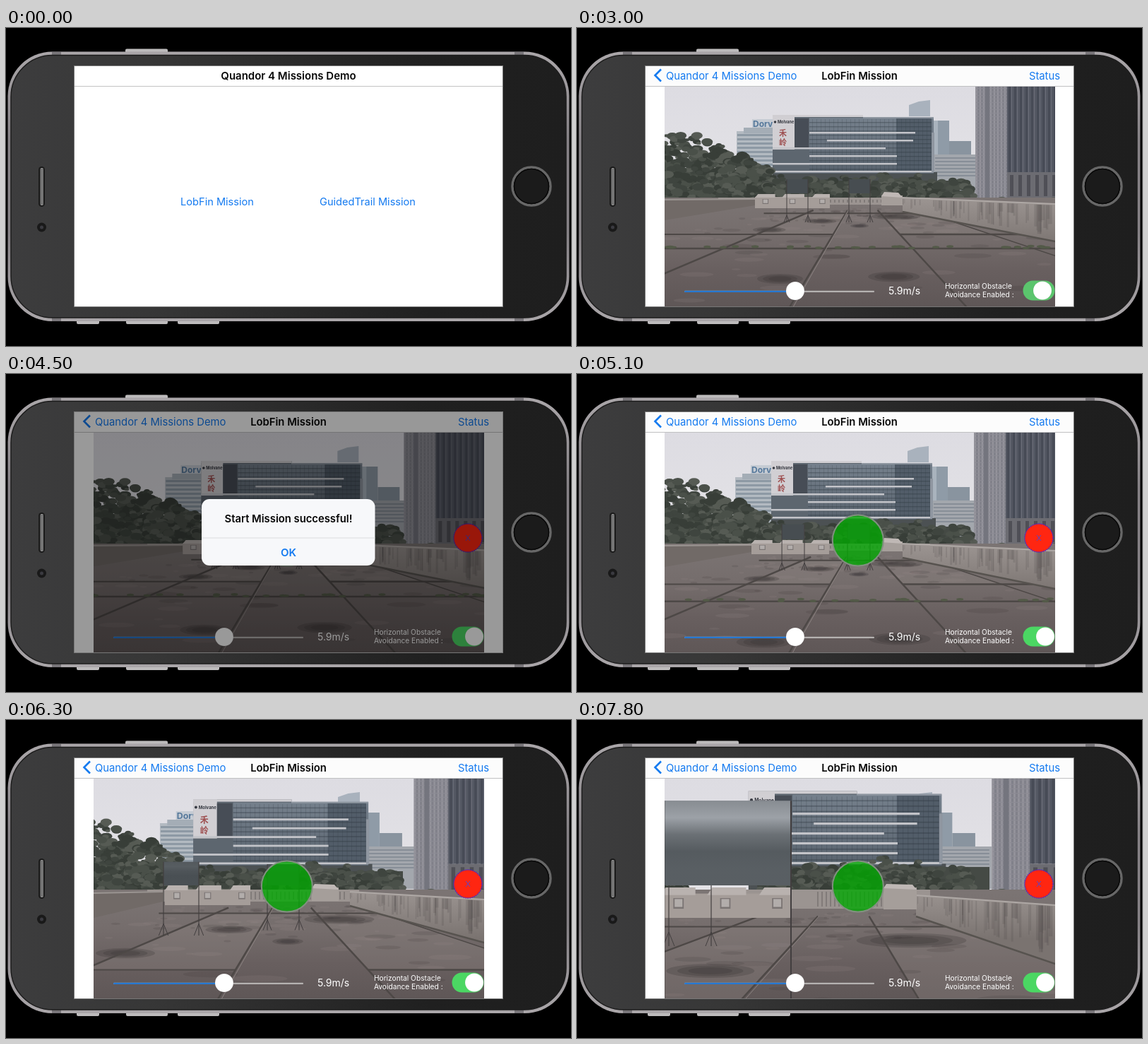
Write an HTML page with a canvas that moves like this. It is 800x450 px and loops after 8000 ms.

```html
<!DOCTYPE html>
<html lang="en">
<head>
<meta charset="utf-8">
<title>Mission demo</title>
<style>
html, body { margin: 0; width: 800px; height: 450px; overflow: hidden; background: #000; }
canvas { display: block; }
</style>
</head>
<body>
<canvas id="stage" width="800" height="450"></canvas>
<script>
const c = document.getElementById('stage').getContext('2d');
const LOOP = 8000, STEP = 300, BLUE = '#147af0';
const KEY_TIMES = [4200, 5100, 6300, 7800];
let now = 0, seed = 1;

const random = () => (seed = seed * 16807 % 2147483647) / 2147483647;

// Piecewise linear value over the flight
function key(...v) {
  if (now <= KEY_TIMES[0]) return v[0];
  for (let i = 1; i < 4; i++) {
    const a = KEY_TIMES[i - 1], b = KEY_TIMES[i];
    if (now <= b) return v[i - 1] + (v[i] - v[i - 1]) * (now - a) / (b - a);
  }
  return v[3];
}

function rect(x, y, w, h, fill) { c.fillStyle = fill; c.fillRect(x, y, w, h); }

function paint(fill, stroke, width) {
  if (fill) { c.fillStyle = fill; c.fill(); }
  if (stroke) { c.strokeStyle = stroke; c.lineWidth = width; c.stroke(); }
}

function round(x, y, w, h, r, fill, stroke, width = 1) {
  c.beginPath();
  c.roundRect(x, y, w, h, r);
  paint(fill, stroke, width);
}

function ellipse(x, y, rx, ry, fill, stroke, width = 1) {
  c.beginPath();
  c.ellipse(x, y, rx, ry, 0, 0, 7);
  paint(fill, stroke, width);
}

function path(points, fill, stroke, width = 1) {
  c.beginPath();
  for (let i = 0; i < points.length; i += 2) c.lineTo(points[i], points[i + 1]);
  paint(fill, stroke, width);
}

function text(s, x, y, size, fill, align = 'left', weight = 400) {
  c.font = `${weight} ${size}px Inter, sans-serif`;
  c.textAlign = align;
  c.fillStyle = fill;
  c.fillText(s, x, y);
}

function gradient(x0, y0, x1, y1, ...colors) {
  const g = c.createLinearGradient(x0, y0, x1, y1);
  colors.forEach((col, i) => g.addColorStop(i / (colors.length - 1), col));
  return g;
}

function phone() {
  rect(0, 0, 800, 450, '#000');
  round(169, 29.5, 60, 8, 2, '#bdbbbc');
  for (const [x, w] of [[100, 32], [170, 59], [243, 59]]) round(x, 411, w, 8, 2, '#bdbbbc');
  round(2.5, 33.5, 795, 381.5, 63, gradient(0, 34, 0, 415, '#aaa6a9', '#858185', '#858185', '#aaa6a9'));
  for (const x of [65, 720]) { rect(x, 34, 13, 5, '#787579'); rect(x, 410, 13, 5, '#787579'); }
  round(7, 38.5, 786, 371.5, 59, gradient(0, 0, 800, 0, '#3d3d3e', '#373737', '#2b2b2b', '#202020', '#1e1e1e'), '#1c1c1c', 1.5);
  ellipse(50.5, 282, 6.5, 6.5, '#191919');
  ellipse(50.5, 282, 2.5, 2.5, '#3a3a40');
  round(46, 196, 9, 57, 4.5, '#1b1b1b');
  round(48.5, 198, 4.5, 53, 2, '#8b8b8b');
  for (let y = 200; y < 250; y += 2) rect(48.5, y, 4.5, 0.8, '#555');
  ellipse(744, 224, 27, 27, '#1b1b1b', '#676767', 3.5);
  ellipse(744, 224, 24.5, 24.5, null, '#080808', 1.5);
  rect(96, 53, 608, 342, '#777');
  rect(97, 54, 606, 340, '#fff');
}

function foliage(x0, x1, top, bottom, count) {
  const colors = ['#3f453f', '#4a5049', '#565b54', '#383e38'];
  for (let i = 0; i < count; i++) {
    const u = random(), v = random() ** 0.8, r = 2 + random() * 3.5;
    const lift = top + (bottom - top) * (2 * u - 1) ** 2 * 0.35;
    ellipse(x0 + (x1 - x0) * u, lift + r + (bottom - lift - r) * v, r * 1.6, r, colors[i % 4]);
  }
}

function farBuildings() {
  c.save();
  c.translate(key(0, -2, -15.5, -22), 0);
  c.scale(key(1, 1, 1.033, 1.05), 1);
  path([470, 125, 470, 109, 484, 104, 500, 102, 500, 125], '#a9b2bd');
  rect(505, 131, 22, 60, '#8f9ba7');
  rect(505, 131, 6, 60, '#a9b3bd');
  rect(527, 160, 31, 30, '#89949f');
  rect(505, 179, 75, 60, '#a3a7ad');
  for (let y = 183; y < 212; y += 5) rect(507, y, 70, 2, '#878e97');
  rect(248, 129, 30, 15, '#c5cbd3');
  rect(226, 146, 52, 66, '#b3bac1');
  rect(236, 141, 42, 8, '#a4adb6');
  for (let y = 150; y < 206; y += 6) rect(227, y, 51, 3, '#8d99a4');
  text('Dorv', 249, 140, 12, '#55789b', 'left', 700);
  c.restore();
}

function nearBuildings() {
  c.save();
  c.translate(key(0, -2, -36.3, -89.6), 206);
  c.scale(key(1, 1, 1.088, 1.2), key(1, 1, 1.13, 1.27));
  c.translate(0, -206);
  rect(277, 204, 233, 36, '#4c5153');
  rect(277, 123, 128, 83, '#5d666f');
  rect(329, 127, 176, 79, gradient(0, 127, 0, 206, '#75808c', '#59636e'));
  rect(452, 127, 50, 76, '#525d69');
  for (let x = 333; x < 502; x += 6) rect(x, 129, 0.7, 74, 'rgba(45,52,62,.25)');
  for (let y = 133; y < 203; y += 6) rect(329, y, 173, 1.5, 'rgba(45,52,62,.35)');
  rect(277, 123, 31, 49, '#d1cfd3');
  rect(308, 128, 20, 43, '#474d56');
  rect(277, 123, 128, 3, '#d0ced2');
  rect(405, 126, 100, 2, '#8d959f');
  for (const [x, y, w] of [[329, 147, 150], [354, 158, 122], [277, 169, 160], [329, 180, 124], [277, 191, 176], [277, 202, 228]])
    rect(x, y, w, 2.5, '#c3c4c9');
  rect(502, 148, 4, 56, '#8f96a0');
  ellipse(280.5, 133, 1.8, 1.8, '#383b43');
  text('Molvane', 284, 135, 5.5, '#33363e', 'left', 700);
  c.font = '700 11px "Noto Sans CJK SC", "Noto Sans CJK", sans-serif';
  c.fillStyle = '#9e5051';
  c.fillText('禾', 286, 153);
  c.fillText('岭', 286, 166);
  // Tower
  rect(564, 0, 46, 240, '#94939b');
  for (let x = 567; x < 608; x += 5) rect(x, 0, 2.8, 240, '#81818a');
  for (let y = 80; y < 236; y += 5) rect(565, y, 44, 1, '#8c8b94');
  rect(578, 0, 6, 240, '#74757e');
  rect(609, 0, 120, 204, '#545863');
  for (let x = 611; x < 720; x += 8) { rect(x, 0, 3, 204, '#474b56'); rect(x + 4, 0, 1, 204, '#6b6d78'); }
  rect(609, 204, 120, 36, '#6c6c72');
  for (let x = 613; x < 720; x += 12) rect(x, 208, 5, 30, '#4f4f56');
  c.restore();
}

function ground() {
  const vx = key(400, 399, 399, 385), camX = key(0, 0, 0, 32), camZ = key(0, 0.13, 0.8, 1.5);
  const at = (x, z) => [vx + (x - camX) / Math.max(z - camZ, 0.25), 230 + 100 / Math.max(z - camZ, 0.25)];
  rect(124, 240, 553, 154, gradient(0, 245, 0, 394, '#7b7473', '#756d6c', '#685f5f', '#5f5757'));
  const seam = (x0, z0, x1, z1, width, color = '#4d4846') => path([...at(x0, z0), ...at(x1, z1)], null, color, width);
  path([...at(-235, 3.1), ...at(-60, 3.1), ...at(-60, 1.61), ...at(-235, 1.61)], 'rgba(140,132,129,.35)');
  path([...at(92, 3.1), ...at(300, 3.1), ...at(300, 1.61), ...at(92, 1.61)], 'rgba(140,132,129,.35)');
  // Stains on the concrete
  seed = 23;
  for (let i = 0; i < 170; i++) {
    const z = 0.6 + random() * 3.2, x = (random() - 0.5) * 850, size = 4 + random() * 26, d = z - camZ;
    if (d < 0.4) continue;
    ellipse(...at(x, z), size / d, size * 0.09 / d + 1, i % 2 ? 'rgba(60,54,54,.16)' : 'rgba(160,150,147,.13)');
  }
  for (const [x, z, w] of [[-230, 1.8, 42], [0, 2, 26], [140, 2.72, 95], [-125, 2.3, 50], [-90, 0.8, 26], [40, 0.82, 30]]) {
    const d = z - camZ, [px, py] = at(x, z);
    if (d < 0.3) continue;
    for (const size of [1, 0.75, 0.5])
      ellipse(px, py, w * size / d, (0.1 * w + 3) * size / d, 'rgba(52,47,49,.24)');
  }
  seam(-420, 3.1, 400, 3.1, 2);
  seam(-700, 1.61, -60, 1.61, 2);
  seam(92, 1.61, 700, 1.61, 2.5);
  seam(-700, 1.22, 700, 1.22, 2.5);
  for (const x of [-235, -60, 92]) seam(x, 3.6, x, 0.3, 2.5);
  seam(-57, 3.6, -57, 0.3, 1, '#8b8381');
  seam(300, 3.1, 300, 0.3, 1.5);
  // Weeds along the wide joint
  seed = 11;
  for (let i = 0; i < 34; i++) {
    const [x, y] = at(-330 + random() * 680, 1.2 + random() * 0.04);
    if (1.22 - camZ > 0.35) ellipse(x, y - 2, 5, 1.8, '#535a48');
  }
}

function walls() {
  const mid = key(250, 250, 257, 267);
  rect(200, 240, 300, mid - 240, '#9b9491');
  for (let x = 340; x < 480; x += 6) rect(x, 243, 2, mid - 246, '#817b79');
  const lx = key(252, 247, 222, 100), lt = key(242, 242, 243, 245), lb = key(251, 252, 257, 265);
  path([124, key(243, 243, 245, 246), lx, lt, lx, lb, 124, key(272, 273, 280, 285)], '#716a67');
  path([124, key(243, 243, 245, 246), lx, lt], null, '#9a9491', 2);
  const rx = key(461, 461, 487, 480), top = key(240, 240, 243, 248), top2 = key(249, 250, 254, 262);
  const bottom = key(260, 260, 263, 278), bottom2 = key(302, 304, 315, 345);
  path([rx, top, 677, top2, 677, bottom2, rx, bottom], gradient(0, 240, 0, 310, '#9c9592', '#7a7370'));
  path([rx, top, 677, top2], null, '#aea8a5', 2);
  seed = 7;
  for (let i = 0; i < 60; i++) {
    const u = random(), x = rx + (677 - rx) * u, y0 = top + (top2 - top) * u, y1 = bottom + (bottom2 - bottom) * u;
    rect(x, y0 + 2, 1 + 6 * random() * u, (y1 - y0 - 3) * (0.3 + random() * 0.6), 'rgba(78,71,69,.2)');
  }
  path([rx, bottom, 677, bottom2], null, '#57534f', 2.5);

  // Sheds
  const x0 = key(252, 247, 225, 118), x1 = key(358, 357, 346, 302), y0 = key(235, 235, 234, 237), y1 = key(255, 255, 262, 280);
  const w = x1 - x0, h = y1 - y0;
  rect(x0, y0 + h * 0.2, w, h * 0.8, '#a59d99');
  for (const [u, size] of [[0, 0.27], [0.36, 0.3], [0.76, 0.24]]) {
    path([x0 + w * u, y0 + h * 0.25, x0 + w * (u + 0.04), y0, x0 + w * (u + size), y0, x0 + w * (u + size), y0 + h * 0.25], '#b9b2af');
    rect(x0 + w * (u + 0.1), y0 + h * 0.35, w * 0.08, h * 0.35, '#7b7574');
    rect(x0 + w * (u + 0.11), y0 + h * 0.38, w * 0.06, h * 0.26, '#b2adab');
  }
  const sx = key(431, 431, 433, 434), sw = key(30, 30, 38, 47), sh = key(18, 18, 23, 35);
  rect(sx, 237, sw, sh - 4, '#a59e9a');
  path([sx, 238, sx + 4, 232, sx + sw - 6, 233, sx + sw, 240], '#bfb8b5');
}

function panel(right, depth) {
  const w = 30 / depth, left = right - w, h = 20 / depth, foot = 230 + 45 / depth;
  const shine = Math.max(0, 0.7 - depth);
  rect(left, 234 - h, w, h, '#474d51');
  const glint = a => `rgba(205,209,216,${shine * a})`;
  rect(left, 234 - h, w, h, gradient(0, 234 - h, 0, 234, glint(0.9), glint(1.2), glint(0.5), glint(0.2), glint(0.25), glint(0.25)));
  for (const x of [left, right]) {
    path([x, 234 - h, x, foot], null, '#423e3f', 0.8 + 0.2 / depth);
    const s = 4 / depth;
    path([x - s, foot, x, foot - 2.5 * s, x + s, foot], null, '#423e3f', 1);
  }
}

function photo() {
  c.save();
  c.beginPath();
  c.rect(124, 83, 553, 311);
  c.clip();
  rect(124, 83, 553, 170, gradient(0, 83, 0, 220, '#dddce2', '#e3e2e6'));
  farBuildings();
  nearBuildings();
  seed = 5;
  const shift = key(0, -4, -28, -120);
  rect(90 + shift, 200, 185, 45, '#434942');
  foliage(85 + shift, 220 + shift, key(143, 143, 135, 130), 242, 520);
  foliage(200 + shift, 275 + shift, key(174, 174, 165, 160), 242, 240);
  const rowTop = key(204, 204, 202, 196);
  rect(262, rowTop + 12, key(278, 278, 300, 322), 35, '#454a45');
  for (let i = 0; i < 6; i++)
    foliage(256 + i * 48, 320 + i * 48, rowTop + (i % 2) * 4 - (i === 3 ? key(5, 5, 8, 10) : 0), 241, 70);
  foliage(575, 690, 236, 251, 25);
  ground();
  walls();
  panel(key(327, 322, 273, 190), key(1, 0.94, 0.6, 0.5));
  const depth = key(1, 0.94, 0.667, 0.167);
  panel(400 + key(15, 14, 10, -16.2) / depth, depth);
  c.restore();
}

function controls() {
  const speed = now < 2400 ? 5 : now < 2700 ? 5.4 : 5.9;
  const knob = 287 + (speed - 5) * 24.4;
  round(152, 371.8, 269, 2.2, 1, '#b5b2b1');
  round(152, 371.8, knob - 152, 2.2, 1, '#2678d2');
  ellipse(knob, 372, 13, 13, '#fff', 'rgba(0,0,0,.12)', 0.6);
  text(speed + 'm/s', 441, 376.5, 14, '#fff');
  text('Horizontal Obstacle', 521, 369, 10.2, '#fff');
  text('Avoidance Enabled :', 521, 381, 10.2, '#fff');

  const on = now >= 3000, settling = now < 3300;
  round(631.5, 357.5, 45, 28, 14, on ? (settling ? '#5bc56d' : '#4bd763') : null, on ? null : '#f2f2f2', 1.5);
  ellipse(on ? (settling ? 659 : 663) : 645, 371.5, 13, 13, '#fff', 'rgba(0,0,0,.1)', 0.6);

  if (now < 4500) return;
  ellipse(397.8, 235.5, 36, 36, 'rgba(0,168,0,.78)', '#829080', 2);
  ellipse(654, 232, 20, 20, '#ff2611');
  c.setLineDash([2, 1]);
  ellipse(654, 232, 20, 20, null, '#5420c0', 1.3);
  c.setLineDash([]);
  text('X', 654, 236, 11, '#6044c0', 'center');
}

function alertBox() {
  rect(97, 54, 606, 340, 'rgba(0,0,0,.4)');
  round(277, 177, 245.5, 94, 11, '#f7f8fa');
  text('Start Mission successful!', 400, 209.5, 14.8, '#050505', 'center', 600);
  rect(277, 231.5, 245.5, 1, '#dcdde0');
  text('OK', 400, 257.5, 15, BLUE, 'center', 600);
}

function menu() {
  text('Quandor 4 Missions Demo', 400, 73, 15, '#080808', 'center', 600);
  rect(97, 82, 606, 1, '#c4c4c4');
  c.globalAlpha = now >= 1500 ? 0.3 : 1;
  text('LobFin Mission', 299, 251, 14.6, BLUE, 'center');
  c.globalAlpha = 1;
  text('GuidedTrail Mission', 512, 251, 14.6, BLUE, 'center');
}

function mission() {
  photo();
  rect(97, 54, 606, 28.5, '#fcfcfc');
  rect(97, 82, 606, 1, '#c0c0c2');
  path([119, 58.5, 110.5, 67, 119, 75.5], null, BLUE, 2.6);
  text('Quandor 4 Missions Demo', 126, 73, 14.8, BLUE);
  text('LobFin Mission', 400, 73, 14.8, '#080808', 'center', 600);
  text('Status', 684, 73, 14.8, BLUE, 'right');
  controls();
  if (now >= 4500 && now < 5100) alertBox();
}

function frame(time) {
  now = Math.floor(time % LOOP / STEP) * STEP;
  phone();
  if (now < 1800) menu(); else mission();
  requestAnimationFrame(frame);
}
requestAnimationFrame(frame);
</script>
</body>
</html>
```
